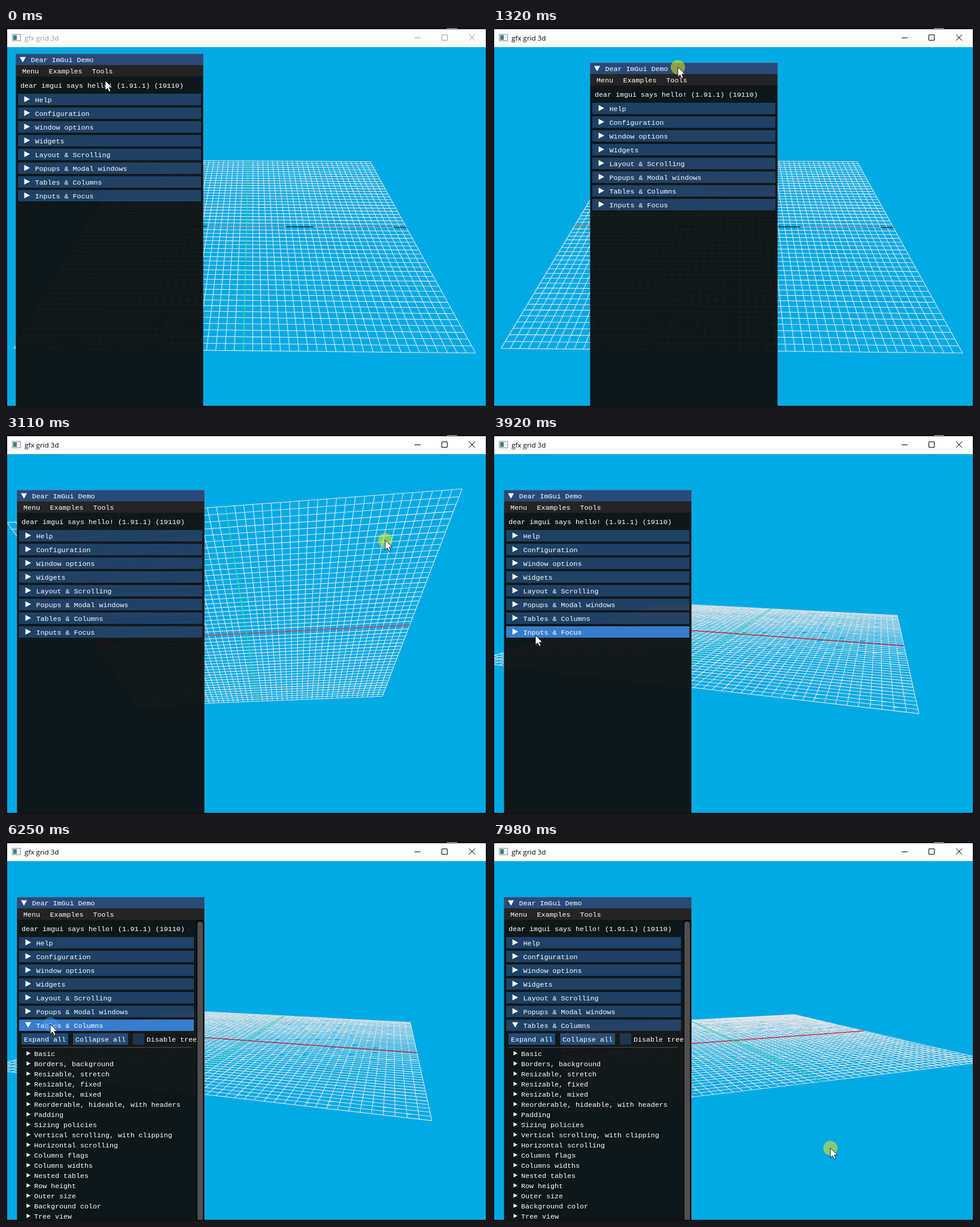
Write an HTML page with a canvas that moves like this. It is 804 by 634 pixels and loops after 8000 ms.

```html
<!DOCTYPE html>
<html lang="en">
<head>
<meta charset="utf-8">
<title>gfx grid 3d</title>
<style>
html, body { margin: 0; width: 100%; height: 100%; overflow: hidden; background: #111216; }
#stage { position: relative; width: 804px; height: 634px; overflow: hidden; background: #111216; }
#stage *, #panel::after { position: absolute; box-sizing: border-box; }
#speck { left: 737px; top: 0; width: 17px; height: 1px; background: #c8ccd2; }
#titlebar { left: 2px; top: 2px; width: 800px; height: 30px; background: #fff; color: #000; }
#titlebar.idle { color: #999; }
#titlebar span { left: 29px; top: 6px; font: 11.6px/18px "Open Sans", "Noto Sans", sans-serif; white-space: pre; }
#titlebar svg { left: 0; top: 0; }
#client { left: 2px; top: 32px; width: 800px; height: 600px; overflow: hidden; background: #00aae4; }
#panel {
  left: 0; top: 0; width: 314px; height: 680px; color: #fff;
  background: rgba(15, 15, 15, .94);
  font: 11.667px/16px "Liberation Mono", "DejaVu Sans Mono", monospace;
}
#panel::after { content: ""; inset: 0; border: 1px solid rgba(110, 110, 128, .5); }
#panel span { white-space: pre; }
#caption { left: 0; top: 0; width: 100%; height: 19px; background: #294a7a; }
#menu { left: 0; top: 19px; width: 100%; height: 19px; background: #242424; }
.header { left: 4px; width: 306px; height: 19px; background: rgba(66, 150, 250, .33); }
.scrolls .header { width: 292px; }
.header.hot { background: rgba(66, 150, 250, .8); }
.arrow { width: 10px; height: 10px; background: #fff; clip-path: polygon(5% 0, 100% 50%, 5% 100%); }
.arrow.down { clip-path: polygon(0 5%, 100% 5%, 50% 95%); }
.arrow.small { width: 7px; height: 7px; }
.section { left: 0; top: 0; width: 300px; height: 680px; overflow: hidden; }
.button { height: 19px; background: rgba(66, 150, 250, .4); }
.box { background: rgba(41, 74, 122, .54); }
.rule { left: 8px; top: 251px; width: 284px; height: 1px; background: rgba(110, 110, 128, .6); }
#track { left: 300px; top: 38px; width: 13px; height: 641px; background: rgba(5, 5, 5, .53); }
#track div { left: 2px; top: 3px; width: 9px; height: 600px; border-radius: 5px; background: #4f4f4f; }
#press { left: -12px; top: -12px; width: 24px; height: 24px; border-radius: 50%; }
#cursor { left: -1px; top: -1px; }
</style>
</head>
<body>
<div id="stage">
  <div id="speck"></div>
  <div id="titlebar">
    <span>gfx grid 3d</span>
    <svg width="800" height="30" fill="none" stroke="currentColor">
      <g stroke="#8b9299"><path fill="#f2f4f5" d="M8.5 8.5h14v11h-14z"/></g>
      <path fill="#3d7f8c" stroke="none" d="M10 10h6v8h-6z"/>
      <path d="M681 14.5h10M726.5 9.5h9v9h-9zM772 9l10 10M782 9l-10 10"/>
    </svg>
  </div>
  <div id="client">
    <canvas id="grid" width="800" height="600"></canvas>
    <div id="panel"></div>
  </div>
  <div id="press"></div>
  <svg id="cursor" width="15" height="22">
    <path transform="translate(1 1)" d="M0 0V16.2L3.7 12.8L6.3 18.6L9 17.4L6.5 11.7H11.6Z" fill="#fff" stroke="#111" stroke-width=".9"/>
  </svg>
</div>
<script>
const LOOP = 8000;
const $ = id => document.getElementById(id);
const panel = $('panel'), press = $('press'), cursor = $('cursor'), ctx = $('grid').getContext('2d');

// Pointer path: time, x, y
const path = [
  [0, 166, 88], [70, 166, 88], [260, 163, 51], [340, 163, 51],
  [830, 656, 193], [900, 656, 193], [1380, 270, 60], [1670, 163, 98],
  [1740, 165, 100], [1940, 165, 100], [2010, 180, 190], [2080, 205, 264],
  [2400, 643, 309], [2470, 643, 309], [2690, 656, 358], [3110, 634, 176],
  [3520, 610, 271], [3600, 608, 269], [3920, 71, 335], [4140, 71, 335],
  [4270, 71, 332], [4360, 71, 332], [4600, 110, 604], [4830, 84, 432],
  [5100, 72, 330], [5300, 72, 330], [5520, 72, 308], [5770, 74, 305],
  [6540, 74, 305], [6610, 110, 322], [7050, 484, 516], [7120, 484, 516],
  [7360, 512, 559], [7520, 540, 608], [7780, 575, 412], [7980, 564, 512], [8000, 564, 512]
];
const presses = [[300, 1840], [2440, 3600], [4280, 4350], [5230, 5300], [6090, 6180], [7090, 8000]];
const orbits = [
  { from: 2470, to: 3600, yaw: -0.75, pitch: 32.6 },
  { from: 7120, to: 8000, yaw: -18.25, pitch: 12.6 }
];

const within = (t, [a, b]) => t >= a && t < b;
const clamp = (v, a, b) => Math.min(b, Math.max(a, v));

// Monotone cubic interpolation, one axis at a time
function along(t, axis) {
  let i = 0;
  while (i < path.length - 2 && path[i + 1][0] <= t) i++;
  const slope = k => k < 0 || k > path.length - 2 ? 0 :
    (path[k + 1][axis] - path[k][axis]) / (path[k + 1][0] - path[k][0]);
  const tangent = k => {
    const a = slope(k - 1), b = slope(k);
    return a * b <= 0 ? 0 : 2 * a * b / (a + b);
  };
  const [a, b] = [path[i], path[i + 1]];
  const h = b[0] - a[0], s = clamp((t - a[0]) / h, 0, 1), r = 1 - s;
  return a[axis] * (1 + 2 * s) * r * r + b[axis] * s * s * (3 - 2 * s) +
    h * s * r * (tangent(i) * r - tangent(i + 1) * s);
}
const pointer = t => ({ x: along(t, 1), y: along(t, 2) });

function add(parent, tag, cls, x, y, w) {
  const el = document.createElement(tag);
  if (cls) el.className = cls;
  if (x !== undefined) el.style.left = x + 'px';
  if (y !== undefined) el.style.top = y + 'px';
  if (w) el.style.width = w + 'px';
  parent.append(el);
  return el;
}
// A line of text whose middle lies at y
function label(parent, text, x, y) {
  add(parent, 'span', '', x, y - 7).textContent = text;
}
function nodes(parent, names) {
  names.forEach((name, i) => {
    const y = 262 + 17 * i;
    add(parent, 'div', 'arrow small', 16, y - 4);
    label(parent, name, 29, y);
  });
}

add(panel, 'div').id = 'caption';
add(panel, 'div').id = 'menu';
add(panel, 'div', 'arrow down', 7, 5);
label(panel, 'Dear ImGui Demo', 25.5, 10);
[['Menu', 11], ['Examples', 55.5], ['Tools', 127.5]].forEach(([s, x]) => label(panel, s, x, 29));
label(panel, 'dear imgui says hello! (1.91.1) (19110)', 8, 53);

const headers = ['Help', 'Configuration', 'Window options', 'Widgets', 'Layout & Scrolling',
  'Popups & Modal windows', 'Tables & Columns', 'Inputs & Focus'].map((name, i) => {
  const el = add(panel, 'div', 'header', 4, 67 + 23 * i);
  const arrow = add(el, 'div', 'arrow', 10, 4);
  label(el, name, 28.5, 10);
  return { el, arrow };
});

const inputs = add(panel, 'div', 'section');
nodes(inputs, ['Inputs', 'Outputs', 'Mouse Cursors', 'Tabbing', 'Focus from code', 'Dragging']);

const tables = add(panel, 'div', 'section');
add(tables, 'div', 'button', 8, 228, 78);
add(tables, 'div', 'button', 94, 228, 92);
add(tables, 'div', 'button box', 194, 228, 19);
label(tables, 'Expand all', 12, 238);
label(tables, 'Collapse all', 98, 238);
label(tables, 'Disable tree indentation', 217, 238);
add(tables, 'div', 'rule');
nodes(tables, ['Basic', 'Borders, background', 'Resizable, stretch', 'Resizable, fixed',
  'Resizable, mixed', 'Reorderable, hideable, with headers', 'Padding', 'Sizing policies',
  'Vertical scrolling, with clipping', 'Horizontal scrolling', 'Columns flags', 'Columns widths',
  'Nested tables', 'Row height', 'Outer size', 'Background color', 'Tree view']);
const track = add(panel, 'div');
track.id = 'track';
add(track, 'div');

// Dragging turns the camera half a degree per pixel
function camera(t) {
  const o = t < orbits[1].from ? orbits[0] : orbits[1];
  const a = pointer(o.from), b = pointer(clamp(t, o.from, o.to));
  return { yaw: o.yaw + (b.x - a.x) / 2, pitch: o.pitch + (b.y - a.y) / 2 };
}

function drawGrid(t) {
  const { yaw, pitch } = camera(t), rad = Math.PI / 180;
  const cy = Math.cos(yaw * rad), sy = Math.sin(yaw * rad);
  const cp = Math.cos(pitch * rad), sp = Math.sin(pitch * rad);
  const focal = 300 / Math.tan(22.5 * rad), dist = 2.72;
  const project = (u, v) => {
    const side = u * cy - v * sy, ahead = u * sy + v * cy;
    const k = focal / (dist + ahead * cp);
    return [400 + side * k, 300 - ahead * sp * k];
  };
  const line = (u0, v0, u1, v1) => {
    ctx.moveTo(...project(u0, v0));
    ctx.lineTo(...project(u1, v1));
  };
  const stroke = (color, width, build) => {
    ctx.beginPath();
    build();
    ctx.strokeStyle = color;
    ctx.lineWidth = width;
    ctx.stroke();
  };
  const still = t < orbits[0].from;
  ctx.clearRect(0, 0, 800, 600);
  stroke('#e4e4e8', 1.1, () => {
    for (let i = -25; i <= 25; i++) {
      line(i / 25, -1, i / 25, 1);
      line(-1, i / 25, 1, i / 25);
    }
  });
  stroke(still ? '#c87888' : '#e6323f', still ? 1 : 1.5, () => line(-1, 0, 1, 0));
  stroke('#14dc82', 1.1, () => line(0, -1, 0, 1));
  if (still) {
    stroke('#111', 1.2, () => [[-.35, -.25], [.25, .42], [.92, 1]].forEach(([a, b]) => line(a, 0, b, 0)));
    stroke('#c07a30', 1.2, () => line(-1, 0, -.92, 0));
  }
}

function drawPanel(t) {
  const grip = pointer(clamp(t, 340, 1740));
  const left = grip.x - 147, top = grip.y - 8;
  panel.style.transform = `translate(${Math.round(left) - 2}px, ${Math.round(top) - 32}px)`;
  const open = { 6: t >= 6180, 7: t >= 4350 && t < 5300 };
  inputs.hidden = !open[7];
  tables.hidden = track.hidden = !open[6];
  panel.classList.toggle('scrolls', open[6]);

  // Hover trails the pointer by one redraw
  const m = pointer(Math.max(0, t - 70));
  const dragging = within(t, presses[0]) || within(t, presses[1]) || within(t, presses[5]);
  headers.forEach(({ el, arrow }, i) => {
    const y = m.y - top - 67 - 23 * i, x = m.x - left;
    el.classList.toggle('hot', !dragging && y >= 0 && y < 20 && x > 4 && x < 310);
    el.hidden = i === 7 && open[6];
    arrow.classList.toggle('down', !!open[i]);
  });
}

function drawPointer(t) {
  const { x, y } = pointer(t);
  const down = presses.some(p => within(t, p));
  const fading = presses.some(p => within(t, [p[1], p[1] + 140]));
  cursor.style.transform = press.style.transform = `translate(${x}px, ${y}px)`;
  press.style.background = down ? 'rgba(240, 235, 20, .53)' : fading ? 'rgba(70, 155, 235, .5)' : 'none';
}

function frame() {
  const t = performance.now() % LOOP;
  $('titlebar').classList.toggle('idle', t < 300);
  drawGrid(t);
  drawPanel(t);
  drawPointer(t);
  requestAnimationFrame(frame);
}
frame();
</script>
</body>
</html>
```
